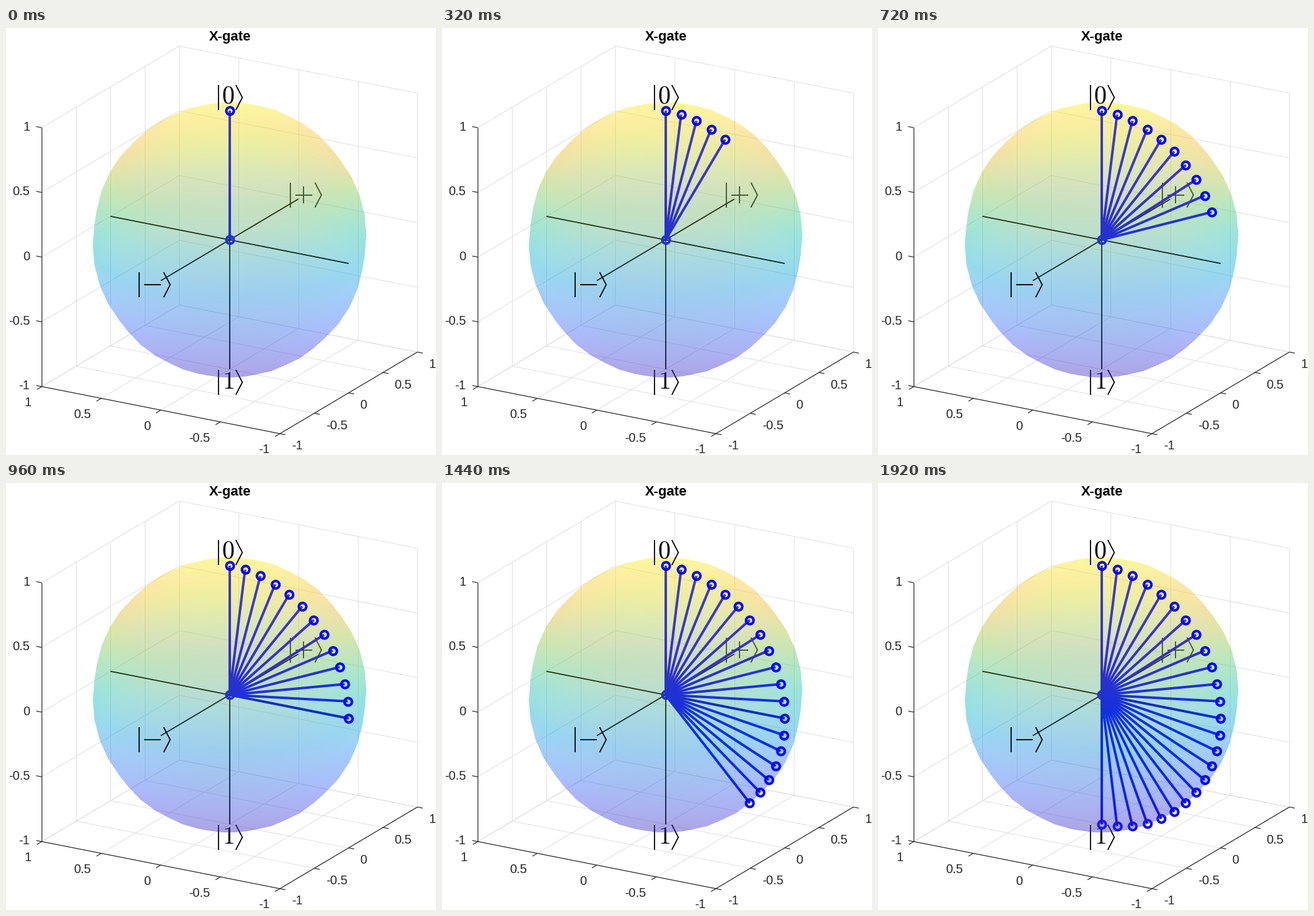
Recreate the animation shown at these times as a matplotlib script. Size 688 px wide and 682 px high, loop 2000 ms.

```python
import numpy as np
import matplotlib.pyplot as plt
from matplotlib.animation import FuncAnimation

W, H, DPI = 688, 682, 64
PX = 72 / DPI                      # points per pixel
FRAMES, STEP_MS = 25, 80
CENTER, R = np.array([357.7, 338.4]), 220
ALPHA = 0.25
INK, BLUE = "#262626", "#0000ff"
TICKS = [-1, -0.5, 0, 0.5, 1]

plt.rcParams["mathtext.fontset"] = "cm"
plt.rcParams["font.family"] = "Liberation Sans"

# Orthographic camera: azimuth -60, elevation 20 degrees
az, el = np.radians([-60, 20])
RIGHT = np.array([np.cos(az), np.sin(az), 0])
AWAY = np.array([-np.sin(az) * np.cos(el), np.cos(az) * np.cos(el), -np.sin(el)])
UP = np.array([-np.sin(az) * np.sin(el), np.cos(az) * np.sin(el), np.cos(el)])

# position, red, green, blue
PARULA = np.array([
    [0, .242, .150, .660], [8, .281, .301, .941], [14, .244, .436, .999],
    [18, .179, .529, .968], [24, .125, .646, .888], [29, .004, .720, .792],
    [32, .096, .750, .712], [38, .291, .797, .519], [44, .617, .788, .261],
    [48, .820, .750, .154], [52, .973, .730, .239], [56, .989, .814, .189],
    [60, .960, .914, .142], [63, .977, .984, .081],
])


def project(x, y, z):
    p = np.array([x, y, z])
    return CENTER + R * np.array([p @ RIGHT, -(p @ UP)])


def parula(z):
    pos = (z + 1) / 2 * 63
    return np.stack([np.interp(pos, PARULA[:, 0], PARULA[:, c]) for c in (1, 2, 3)], -1)


def sphere_layers(box, n=20, ss=2):
    """RGBA images of the near and far shell of an n-by-n faceted sphere."""
    x0, x1, y0, y1 = box
    sx = (np.arange((x1 - x0) * ss) + 0.5) / ss + x0
    sy = (np.arange((y1 - y0) * ss) + 0.5) / ss + y0
    X = ((sx - CENTER[0]) / R).astype(np.float32)[None, :]
    Y = ((CENTER[1] - sy) / R).astype(np.float32)[:, None]
    near = np.full((len(sy), len(sx)), -9, np.float32)
    far = -near
    half = np.pi / n
    lat = np.linspace(-np.pi / 2, np.pi / 2, n + 1)
    rad, hgt = np.cos(lat) * np.cos(half), np.sin(lat)
    for i in range(n):
        nr, nz = hgt[i + 1] - hgt[i], rad[i] - rad[i + 1]
        d = nr * rad[i] + nz * hgt[i]
        for lon in half * (2 * np.arange(n) + 1):
            normal = np.array([nr * np.cos(lon), nr * np.sin(lon), nz])
            a, b, c = (float(normal @ v) for v in (RIGHT, UP, AWAY))
            t = X * np.float32(-a / c) + (Y * np.float32(-b / c) + np.float32(d / c))
            if c < 0:
                np.maximum(near, t, out=near)
            else:
                np.minimum(far, t, out=far)
    inside = (near < far).astype(float)

    def shrink(a):
        return a.reshape(y1 - y0, ss, x1 - x0, ss, -1).mean((1, 3))

    cover = shrink(inside)
    layers = []
    for t in (near, far):
        rgb = parula(np.clip(Y * UP[2] + t * AWAY[2], -1, 1)) * inside[..., None]
        rgb = shrink(rgb) / np.maximum(cover, 1e-6)
        layers.append(np.concatenate([np.clip(rgb, 0, 1), cover * ALPHA], -1))
    return layers


fig = plt.figure(figsize=(W / DPI, H / DPI), dpi=DPI, facecolor="white")
ax = fig.add_axes([0, 0, 1, 1])
ax.axis("off")


def path(points, color, width, z, **kw):
    return ax.plot(*zip(*points), color=color, lw=width * PX, zorder=z,
                   solid_capstyle="butt", solid_joinstyle="miter", **kw)[0]


def line(p, q, color, width, z, **kw):
    return path([p, q], color, width, z, **kw)


def ring(p, z):
    return ax.plot(*p, "o", mfc="none", mec=BLUE, ms=12 * PX, mew=4 * PX, zorder=z)[0]


def label(x, y, s, size=20, ha="center", z=9, color=INK, **kw):
    ax.text(x, y, s, fontsize=size * PX, ha=ha, va="baseline", zorder=z, color=color, **kw)


def ket(pos, sign, z, em=40):
    """Ket symbol centred on a 3D point, spaced like Computer Modern."""
    x, y = project(*pos)
    wide = 0.778 if sign in "+-" else 0.5
    left = x - (0.278 + wide + 0.389) / 2 * em
    mid = left + (0.278 + wide / 2) * em
    bar = left + 0.139 * em
    angle = left + (0.278 + wide + 0.056) * em
    line((bar, y - em / 2), (bar, y + em / 2), "black", 1.8, z)
    path([(angle, y - em / 2), (angle + 0.26 * em, y), (angle, y + em / 2)], "black", 1.8, z)
    if sign in "+-":
        arm = 0.333 * em
        line((mid - arm, y), (mid + arm, y), "black", 1.8, z)
        if sign == "+":
            line((mid, y - arm), (mid, y + arm), "black", 1.8, z)
    else:
        label(mid, y + em / 4, f"${sign}$", em, z=z, color="black")


# Grid on the two back walls and the floor
for t in TICKS:
    for p, q in [((1, t, -1), (1, t, 1)), ((1, -1, t), (1, 1, t)),
                 ((t, 1, -1), (t, 1, 1)), ((-1, 1, t), (1, 1, t)),
                 ((t, -1, -1), (t, 1, -1)), ((-1, t, -1), (1, t, -1))]:
        line(project(*p), project(*q), "#dfdfdf", 1, 1)

# Rulers, ticks and tick labels
line(project(-1, 1, -1), project(-1, 1, 1), INK, 1.2, 2)
line(project(-1, 1, -1), project(-1, -1, -1), INK, 1.2, 2)
line(project(-1, -1, -1), project(1, -1, -1), INK, 1.2, 2)
out_x = (project(-1, 0, 0) - CENTER) / 127.5 * 9
out_y = (project(0, -1, 0) - CENTER) / 194 * 9
for t in TICKS:
    s = f"{t:g}"
    for p, out, dx, dy, ha in [
        (project(-1, 1, t), -out_y, -19, 4.6, "right"),
        (project(-1, t, -1), out_x, -16.5, 31.5, "right"),
        (project(t, -1, -1), out_y, 18.5, 25.5, "left"),
    ]:
        line(p, p + out, INK, 1.2, 2)
        label(p[0] + dx, p[1] + dy, s, ha=ha)
label(358, 20, "X-gate", 22, color="black", weight="bold")

# State labels; those behind the sphere are tinted by both shells
ket((0, 0, 1.1), "0", 9)
ket((0, 0, -1.1), "1", 2)
ket((1.1, 0, 0), "+", 2)
ket((-1.1, 0, 0), "-", 9)

# Translucent sphere
box = (136, 580, 116, 562)
near, far = sphere_layers(box)
for img, z in ((far, 3), (near, 7)):
    ax.imshow(img, extent=(box[0], box[1], box[3], box[2]), zorder=z,
              interpolation="nearest", aspect="auto")

# Axes through the centre, glinting through the vectors that overlap them
for p in np.eye(3):
    line(project(*-p), project(*p), "black", 1.8, 4)
line(project(0, 0, -1), project(0, 0, 1), "black", 1, 6, alpha=0.5, ls=(0, (1, 4)))
line(project(0, -0.15, 0), project(0, -1, 0), "black", 1.4, 6, alpha=0.7, ls=(0, (4, 1.5)))

ring(CENTER, 5)
vectors = []
for theta in np.linspace(0, np.pi, FRAMES):
    v = np.array([0, -np.sin(theta), np.cos(theta)])
    tip = project(*v)
    vectors.append((line(CENTER, tip, BLUE, 4, 5), ring(tip, 8 if v @ AWAY < 0 else 2)))

ax.set_xlim(0, W)
ax.set_ylim(H, 0)


def update(k):
    for i, pair in enumerate(vectors):
        for artist in pair:
            artist.set_visible(i <= k)
    return [a for pair in vectors for a in pair]


anim = FuncAnimation(fig, update, frames=FRAMES, interval=STEP_MS,
                     repeat=True, repeat_delay=0, blit=False)
plt.show()
```
